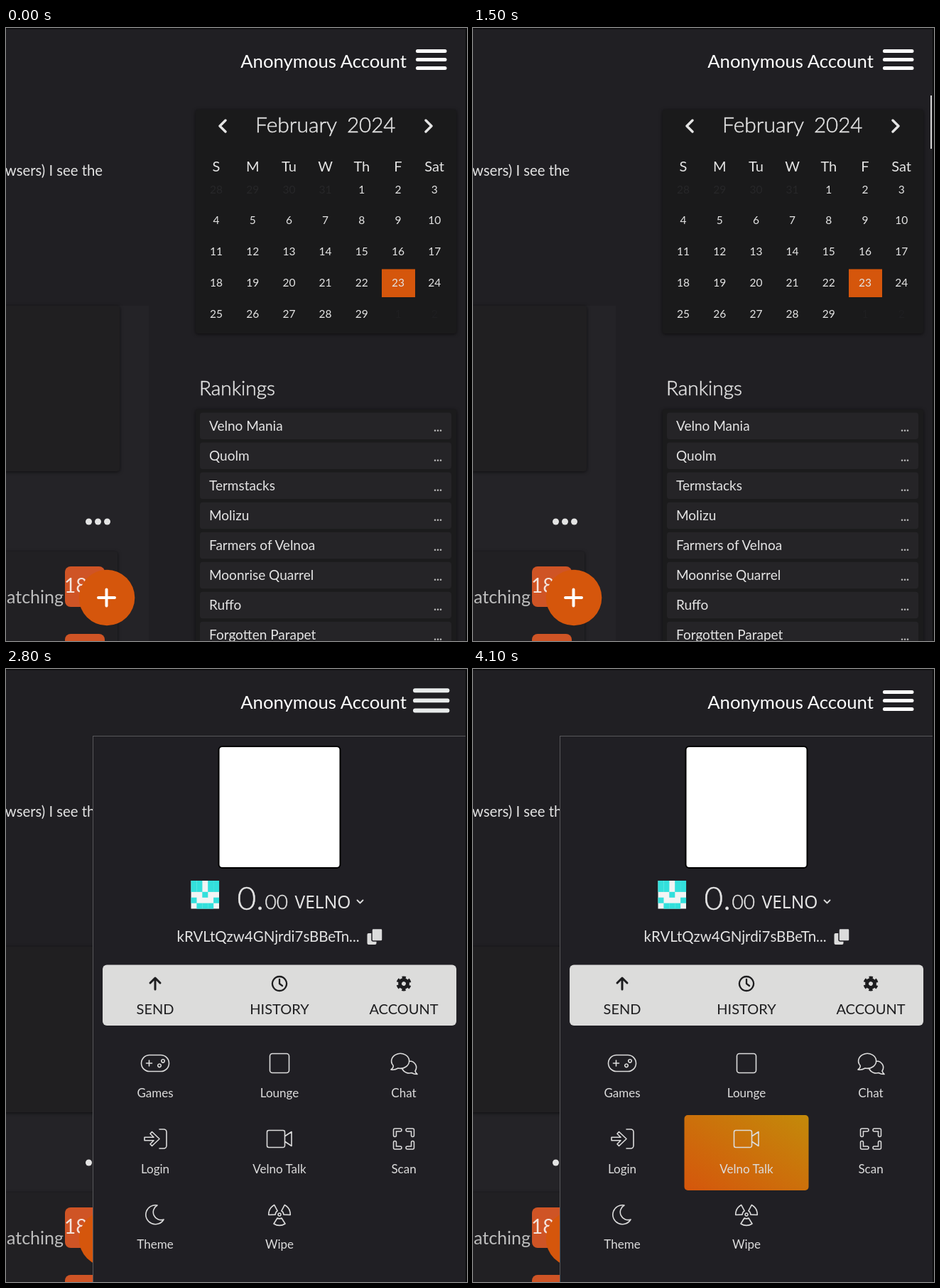
Animation, 649 px wide and 863 px high, one loop 4.2 s. Source, as an HTML page:

```html
<!DOCTYPE html>
<html lang="en">
<head>
<meta charset="utf-8">
<style>
html, body { margin: 0; width: 100%; height: 100%; overflow: hidden; background: #201f23; }
#stage { display: block; font-family: Lato, "Open Sans", sans-serif; }
.mid { text-anchor: middle; }
.end { text-anchor: end; }
.light { font-weight: 300; stroke: #e4e4e4; stroke-width: .5; }
.line { fill: none; stroke-linecap: round; stroke-linejoin: round; }
</style>
</head>
<body>
<svg id="stage" width="649" height="863" viewBox="0 0 649 863" fill="#e4e4e4">
  <defs>
    <linearGradient id="glow" x1="0" y1="1" x2="1" y2="0">
      <stop stop-color="#d5560c"/><stop offset="1" stop-color="#c38a0a"/>
    </linearGradient>
    <filter id="soft" x="-10%" y="-10%" width="120%" height="120%" color-interpolation-filters="sRGB">
      <feDropShadow dx="0" dy="1" stdDeviation="2.5" flood-color="#000" flood-opacity=".6"/>
    </filter>
  </defs>
  <rect width="649" height="863" fill="#201f23"/>
  <g id="post"></g>
  <g id="side"></g>
  <rect id="scroll" x="644" y="95" width="2" height="75" fill="#d4d4d4"/>
  <svg id="menu" y="94" height="769"></svg>
  <text class="end" x="564" y="56" font-size="25.7" fill="#fff">Anonymous Account</text>
  <path id="burger" class="line" d="M-19.3-12H19.3M-19.3 0H19.3M-19.3 12H19.3" stroke-width="5"/>
  <path d="M0 .5H649M648 0V863" stroke="#0b0b0c" stroke-width="2" fill="none"/>
</svg>
<script>
const LOOP = 4200, STEP = 100, RIGHT = 647, FULL = 525;
const $ = id => document.getElementById(id);
const clamp = v => Math.min(1, Math.max(0, v));
const ramp = (t, start, span) => clamp((t - start) / span);

const text = (x, y, size, s, cls = '', extra = '') =>
  `<text x="${x}" y="${y}" font-size="${size}" class="${cls}" ${extra}>${s}</text>`;
const rect = (x, y, w, h, fill, r = 0, extra = '') =>
  `<rect x="${x}" y="${y}" width="${w}" height="${h}" rx="${r}" fill="${fill}" ${extra}/>`;
const line = (d, color, width, extra = '') =>
  `<path class="line" d="${d}" stroke="${color}" stroke-width="${width}" ${extra}/>`;
const at = (x, y, s) => `<g transform="translate(${x} ${y})">${s}</g>`;

function drawPost() {
  const dots = [116.5, 129.5, 142.5].map(x => `<circle cx="${x}" cy="695" r="4.5"/>`).join('');
  return `<g id="hover">${rect(0, 113, 227, 750, '#33332f')}</g>` +
    rect(0, 391, 201, 472, '#242327') +
    rect(-10, 391, 170, 233, '#201f21', 4, 'filter="url(#soft)"') +
    rect(-10, 737, 167, 140, '#212023', 4, 'filter="url(#soft)"') +
    text(136, 208, 20.3, 'wsers) I see the', 'end') + dots +
    text(81, 810, 25, 'atching', 'end', 'fill="#bdbdbd"') +
    rect(83, 758, 56, 57, '#cf5425', 8) + rect(83, 853, 56, 57, '#cf5425', 8) +
    text(82, 795, 28, '18', '', 'fill="#f4e4dc"') +
    '<circle cx="142" cy="802" r="39.3" fill="#d5560c"/>' +
    line('M130 802h23M141.5 790.5v23', '#fff', 4);
}

function drawCalendar() {
  const col = i => 296 + 51.2 * i;
  let s = rect(267, 115, 367, 315, '#1a1a1b', 3, 'filter="url(#soft)"') +
    line('M309 130l-8 8 8 8M591 130l8 8-8 8', '#e4e4e4', 3.4) +
    text(351, 147, 30, 'February', 'light') + text(480, 147, 29.5, '2024', 'light') +
    rect(546, 121, 1, 32, '#bbb', 0, 'id="caret"') +
    rect(529, 339.5, 47, 39.5, '#d5560c');
  ['S', 'M', 'Tu', 'W', 'Th', 'F', 'Sat'].forEach((d, i) => s += text(col(i), 202, 20, d, 'mid'));
  for (let i = 0; i < 35; i++) {
    const n = i - 3, inside = n > 0 && n < 30;
    const label = n < 1 ? n + 31 : inside ? n : n - 29;
    s += text(col(i % 7), 232.5 + 43.8 * (i / 7 | 0), 15.5, label, 'mid',
      inside ? '' : `fill="${n < 1 ? '#272729' : '#1f1f21'}"`);
  }
  return s;
}

function drawRankings() {
  const games = ['Velno Mania', 'Quolm', 'Termstacks', 'Molizu', 'Farmers of Velnoa',
    'Moonrise Quarrel', 'Ruffo', 'Forgotten Parapet'];
  return text(272, 517, 28, 'Rankings', 'light') +
    rect(267, 537, 367, 340, '#1b1b1c', 3, 'filter="url(#soft)"') +
    games.map((name, i) => at(273, 541.5 + 42.05 * i,
      rect(0, 0, 354, 37.5, '#252427', 4) + text(13, 25.5, 19, name) +
      text(329, 26.5, 17, '...', '', 'font-weight="700" fill="#b5b5b5"'))).join('');
}

const INK = '#1d1d1f', PALE = '#dcdcdc';
const blade = 'M3 5L8 13a15.5 15.5 0 0 1-16 0L-3 5a6 6 0 0 0 6 0z';
const corners = 'M-12.5-5v-7.5h7.5M5-12.5h7.5v7.5M12.5 5v7.5h-7.5M-5 12.5h-7.5v-7.5';
const actions = [
  ['SEND', line('M0 8V-8M-7-1l7-7 7 7', INK, 3)],
  ['HISTORY', line('M0-6v6l4 3M0-10a10 10 0 1 0 .01 0z', INK, 2.3)],
  ['ACCOUNT', `<g fill="none" stroke="${INK}" transform="rotate(30)"><circle r="5.4" stroke-width="5"/>
    <circle r="8.5" stroke-width="4" stroke-dasharray="4.9 4" stroke-dashoffset="2.45"/></g>`]
];
const tools = [
  ['Games', 'M-8-11.5H8a11.5 11.5 0 0 1 0 23H-8a11.5 11.5 0 0 1 0-23zM-12.5 0h8M-8.5-4v8' +
    'M6 1a2.3 2.3 0 1 0 .01 0zM11-5.5a2.3 2.3 0 1 0 .01 0z'],
  ['Lounge', 'M-10-13.5h20a3.5 3.5 0 0 1 3.5 3.5v20a3.5 3.5 0 0 1-3.5 3.5h-20a3.5 3.5 0 0 1-3.5-3.5v-20a3.5 3.5 0 0 1 3.5-3.5z'],
  ['Chat', 'M-18 9q4-3 3-6a12.5 10.5 0 1 1 7 4q-5 3-10 2zM8-3a9.5 9 0 0 1 8 14q1 3 3 4.5q-5 0-8-2a11 10 0 0 1-13-5'],
  ['Login', 'M-15-2.2h13l-5-5 2.5-2.8 10.5 10-10.5 10-2.5-2.8 5-5h-13zM6-13.5h6a4 4 0 0 1 4 4v19a4 4 0 0 1-4 4h-6'],
  ['Velno Talk', 'M-15-12H5a2.5 2.5 0 0 1 2.5 2.5v19A2.5 2.5 0 0 1 5 12h-20a2.5 2.5 0 0 1-2.5-2.5v-19a2.5 2.5 0 0 1 2.5-2.5zM8-4l9-6v20l-9-6'],
  ['Scan'],
  ['Theme', 'M3-13a13.5 13.5 0 1 0 9 20a11 11 0 0 1-9-20z'],
  ['Wipe', 'M0-2a2 2 0 1 0 .01 0z']
];

function icon(name, d) {
  if (name === 'Scan') return line(corners, PALE, 5.5) + line(corners, '#201f24', 2.4);
  const blades = name === 'Wipe'
    ? [0, 120, 240].map(a => line(blade, PALE, 1.6, `transform="rotate(${a})"`)).join('') : '';
  return line(d, PALE, 1.6) + blades;
}

function drawMenu() {
  const cells = ['11011', '11011', '00100', '10001', '01110'];
  const avatar = rect(-124, 204, 39.5, 39.5, '#f2f4f4') + cells.map((row, y) =>
    [...row].map((c, x) => +c ? rect(-124 + 7.9 * x, 204 + 7.9 * y, 8, 8, '#33e0dc') : '').join('')).join('');
  const head = rect(-85, 15, 171, 171, '#fff', 5, 'stroke="#000" stroke-width="2"') + avatar +
    text(-59, 245, 46, '0.', 'light') + text(-20, 243.5, 28, '00', 'light') +
    text(22, 243, 24.5, 'VELNO', '', 'font-family="Noto Sans, sans-serif"') +
    line('M110 231.5l4 4 4-4', PALE, 1.8) +
    text(-144, 290, 20.5, 'kRVLtQzw4GNjrdi7sBBeTn...') +
    rect(124, 278, 13, 16, PALE, 2) +
    rect(130.5, 271.5, 15, 17.5, PALE, 2, 'stroke="#201f24" stroke-width="1.5"');
  const columns = [0, 1, 2].map(i => {
    const [label, sign] = actions[i];
    let s = at(0, 349, sign) + text(0, 392, 20, label, 'mid', `fill="${INK}"`);
    if (i === 1) s += rect(-87.5, 534, 175, 106, 'url(#glow)', 5, 'id="tile"');
    for (let k = i; k < tools.length; k += 3) {
      const y = 461 + 106.5 * (k / 3 | 0);
      s += at(0, y, icon(...tools[k])) + text(0, y + 48.3, 17, tools[k][0], 'mid', `fill="${PALE}"`);
    }
    return `<g class="column">${s}</g>`;
  }).join('');
  return rect(0, 0, '100%', '100%', '#201f24') + rect(0, 0, '100%', 1, '#57575a') +
    rect(0, 0, 1, '100%', '#57575a') + rect('2.67%', 322.5, '94.86%', 85.5, '#dcdcdb', 6) +
    `<g id="head">${head}</g>` + columns;
}

$('post').innerHTML = drawPost();
$('side').innerHTML = drawCalendar() + drawRankings();
$('menu').innerHTML = drawMenu();
const columns = [...document.querySelectorAll('.column')];
const show = (id, on) => $(id).setAttribute('visibility', on ? 'visible' : 'hidden');
const move = (el, x) => el.setAttribute('transform', `translate(${x} 0)`);

// Quick start, long settle
const ease = p => clamp(p * p * (3 - 2 * p) * (2.2 - 1.2 * p));

function render(t) {
  show('hover', t >= 300 && t < 1100);
  show('scroll', t >= 300);
  show('caret', t >= 1800);
  show('tile', t >= 3900);

  const grow = t < 2500 ? ramp(t, 1760, 200) : ramp(t, 2560, 200) - ramp(t, 3360, 200);
  $('burger').setAttribute('transform', `translate(598.7 44.4) scale(${1 + 0.18 * grow})`);
  $('burger').setAttribute('stroke', grow > 0 ? '#e8ebeb' : '#fff');

  const w = FULL * ease(ramp(t, 2480, 240));
  const menu = $('menu');
  menu.setAttribute('x', RIGHT - w);
  menu.setAttribute('width', w);
  menu.setAttribute('opacity', ramp(t, 2480, 300));
  move($('head'), w / 2);
  columns.forEach((c, i) => move(c, w * (i + 0.5) / 3 + 0.5));
}

const start = performance.now();
function tick() {
  const t = (performance.now() - start) % LOOP;
  render(Math.floor(t / STEP) * STEP);
  requestAnimationFrame(tick);
}
tick();
</script>
</body>
</html>
```
